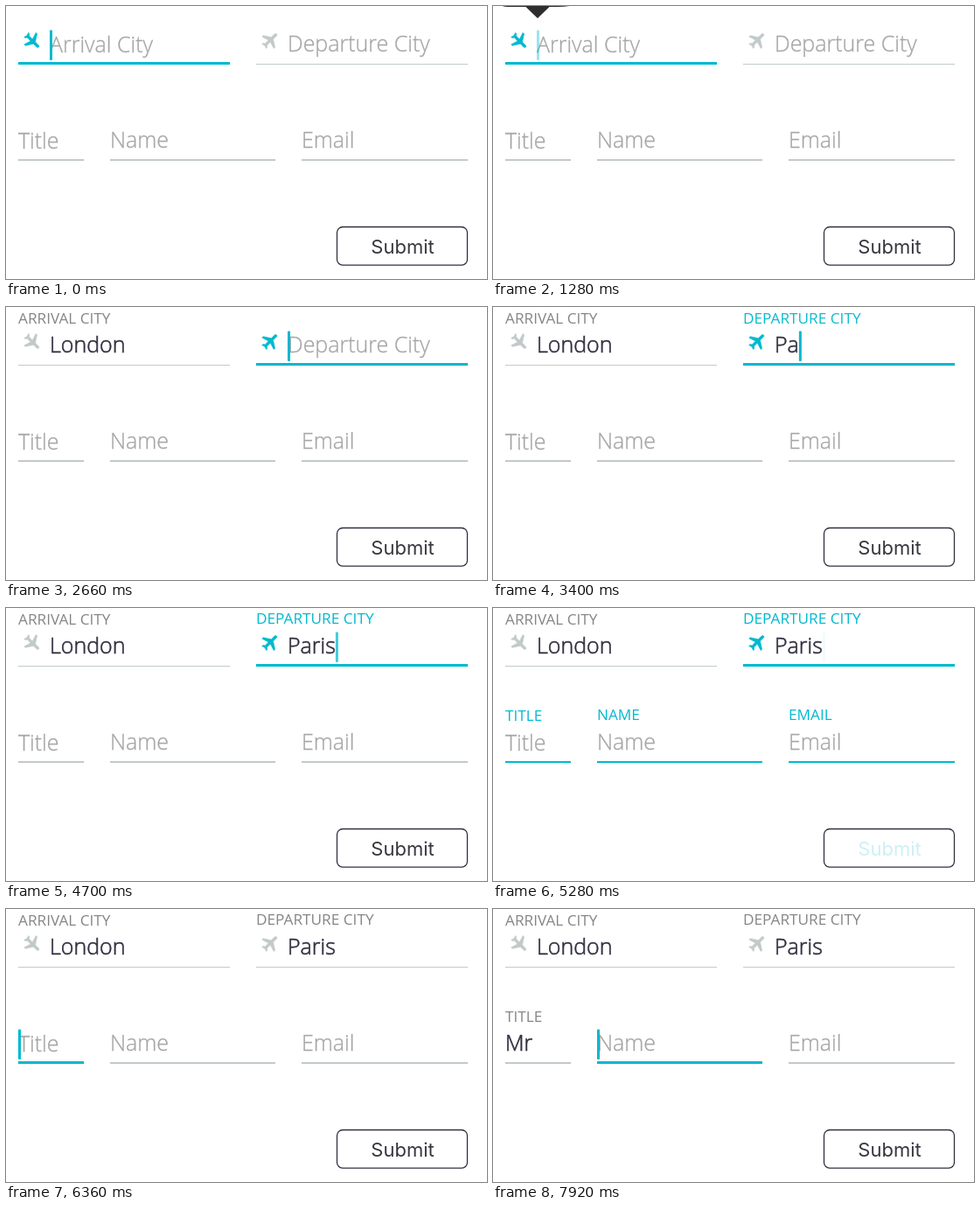
An HTML page that plays this animation: 550x312 px, repeating every 8 s.

```html
<!DOCTYPE html>
<html lang="en">
<head>
<meta charset="utf-8">
<title>Booking form</title>
<style>
  html, body { margin: 0; width: 100%; height: 100%; overflow: hidden; background: #fff; }
  svg { display: block; width: 550px; height: 312px; }
  text { font-family: "Open Sans", "Noto Sans", sans-serif; white-space: pre; }
  .entry { font-size: 25px; font-weight: 300; stroke-width: .35; }
  .hint { fill: #a6a6a6; stroke: #a6a6a6; }
  .value { fill: #332f40; stroke: #332f40; stroke-width: .6; }
  .label { font-size: 17.2px; }
  .submit { font-family: Inter, Roboto, sans-serif; font-size: 22px; text-anchor: middle; }
</style>
</head>
<body>
<svg id="stage" viewBox="0 0 550 312"></svg>
<script>
const LOOP = 8000, TEAL = '#00b9cf', GREY = '#c2cac9', LABEL = '#858585', INK = '#332f40';
const PLANE = 'M21 16v-2l-8-5V3.500c0-.83-.67-1.500-1.500-1.500S10 2.670 10 3.500V9l-8 5v2l8-2.500V19l-2 1.500V22l3.500-1 3.500 1v-1.500L13 19v-5.500l8 2.500z';
const CHECK = { from: 4950, to: 5480 };
const TAPS = [-450, 690];
const stage = document.getElementById('stage');

function add(tag, attrs) {
  const node = document.createElementNS('http://www.w3.org/2000/svg', tag);
  set(node, attrs);
  return stage.appendChild(node);
}
function set(node, attrs) {
  for (const key in attrs) node.setAttribute(key, attrs[key]);
}
function write(node, text) {
  if (node.textContent !== text) node.textContent = text;
}

const clamp = p => Math.min(1, Math.max(0, p));
const ease = p => 1 - (1 - clamp(p)) ** 3;
const within = (t, { from, to }) => t >= from && t < to;
// rises after "from", falls after "to"
const pulse = (t, from, to, rise, fall) => clamp((t - from) / rise) - clamp((t - to) / fall);

// from/to: time in focus; value is typed from "start", one letter per "gap"; dip: lower text
const fields = [
  { hint: 'Arrival City', left: 14, right: 256, bottom: 67, dip: 1, turn: 135, from: 0, to: 2660, value: 'London', start: 1580, gap: 145 },
  { hint: 'Departure City', left: 286, right: 528, bottom: 67, dip: 0, turn: 45, from: 2660, to: 6360, value: 'Paris', start: 3240, gap: 100 },
  { hint: 'Title', left: 14, right: 89, bottom: 177, dip: 1, from: 6360, to: 7720, value: 'Mr', start: 7040, gap: 200 },
  { hint: 'Name', left: 119, right: 308, bottom: 177, dip: 0, from: 7720, to: LOOP, value: '' },
  { hint: 'Email', left: 338, right: 528, bottom: 177, dip: 0, value: '' }
];

for (const f of fields) {
  f.x = f.left + (f.turn ? 36 : 0);
  f.thin = f.turn ? 1 : 2;
  f.checked = !f.turn;
  f.keys = [...f.value].map((_, i) => f.start + i * f.gap);
  if (f.turn) {
    f.plane = add('path', { d: PLANE, 'stroke-width': .6, 'stroke-linejoin': 'round',
      transform: `translate(${f.left + 16.3} ${f.bottom - 28 + f.dip}) rotate(${f.turn}) translate(-11.5 -12)` });
  }
  f.line = add('rect', { x: f.left, width: f.right - f.left });
  f.hintText = add('text', { class: 'entry hint', x: f.x, y: f.bottom - 15.5 + f.dip });
  f.valueText = add('text', { class: 'entry value', x: f.x, y: f.bottom - 15.5 });
  f.label = add('text', { class: 'label', x: f.left });
  write(f.hintText, f.hint);
  write(f.label, f.hint.toUpperCase());
}
add('rect', { x: 378.5, y: 252.5, width: 149, height: 43.7, rx: 6.5, fill: 'none', stroke: INK, 'stroke-width': 1.3 });
const submit = add('text', { class: 'submit', x: 453.5, y: 282.7 });
write(submit, 'Submit');
const caret = add('rect', { width: 3, height: 34.5, rx: 1, fill: TEAL });
const menu = add('path', { d: 'M6 -20V-6Q7 1 17 1H37.5L51 14L64.5 1H74Q88 1 100 -3V-20Z', fill: '#2e2e2e' });

// solid for half a second after each input, then blinking once a second
const inputs = [...TAPS, ...fields.flatMap(f => f.from ? [f.from, ...f.keys] : f.keys)];
function blink(t) {
  const idle = t - Math.max(...inputs.filter(time => time <= t));
  if (idle < 500) return 1;
  const phase = (idle - 500) % 1000;
  return 1 - pulse(phase, 0, 480, 150, 110);
}

function labelShown(f, t) {
  const typed = f.value ? ease((t - f.start) / 240) : 0;
  const check = f.checked ? ease((t - CHECK.from) / 270) - ease((t - CHECK.to) / 300) : 0;
  return Math.max(typed, check);
}

function drawField(f, t) {
  const active = within(t, f);
  const failed = f.checked && within(t, CHECK);
  const fading = f.checked && within(t, { from: CHECK.from, to: CHECK.to + 300 });
  const typed = f.value.slice(0, f.keys.filter(k => k <= t).length);
  const thick = active ? 3 : f.thin;
  const tint = active ? TEAL : GREY;
  const shown = labelShown(f, t);

  set(f.line, { y: f.bottom - thick, height: thick, fill: failed ? TEAL : tint });
  if (f.plane) set(f.plane, { fill: tint, stroke: tint });
  write(f.valueText, typed);
  set(f.hintText, { opacity: typed ? 0 : 1 });
  set(f.label, {
    y: f.bottom - 49 + f.dip + 18 * (1 - shown),
    opacity: shown,
    fill: active || fading ? TEAL : LABEL
  });
  if (active) {
    const x = f.x + (typed ? f.valueText.getComputedTextLength() : 0);
    set(caret, { x, y: f.bottom - 39.5, opacity: blink(t) });
  }
}

function draw(t) {
  for (const f of fields) drawField(f, t);
  const press = pulse(t, 4910, 5390, 90, 310);
  set(submit, { fill: press > .5 ? TEAL : '#38363e', opacity: 1 - .8 * press });
  set(menu, { opacity: pulse(t, 880, 1570, 160, 190) });
}

const start = performance.now();
function tick() {
  draw((performance.now() - start) % LOOP);
  requestAnimationFrame(tick);
}
tick();
</script>
</body>
</html>
```
